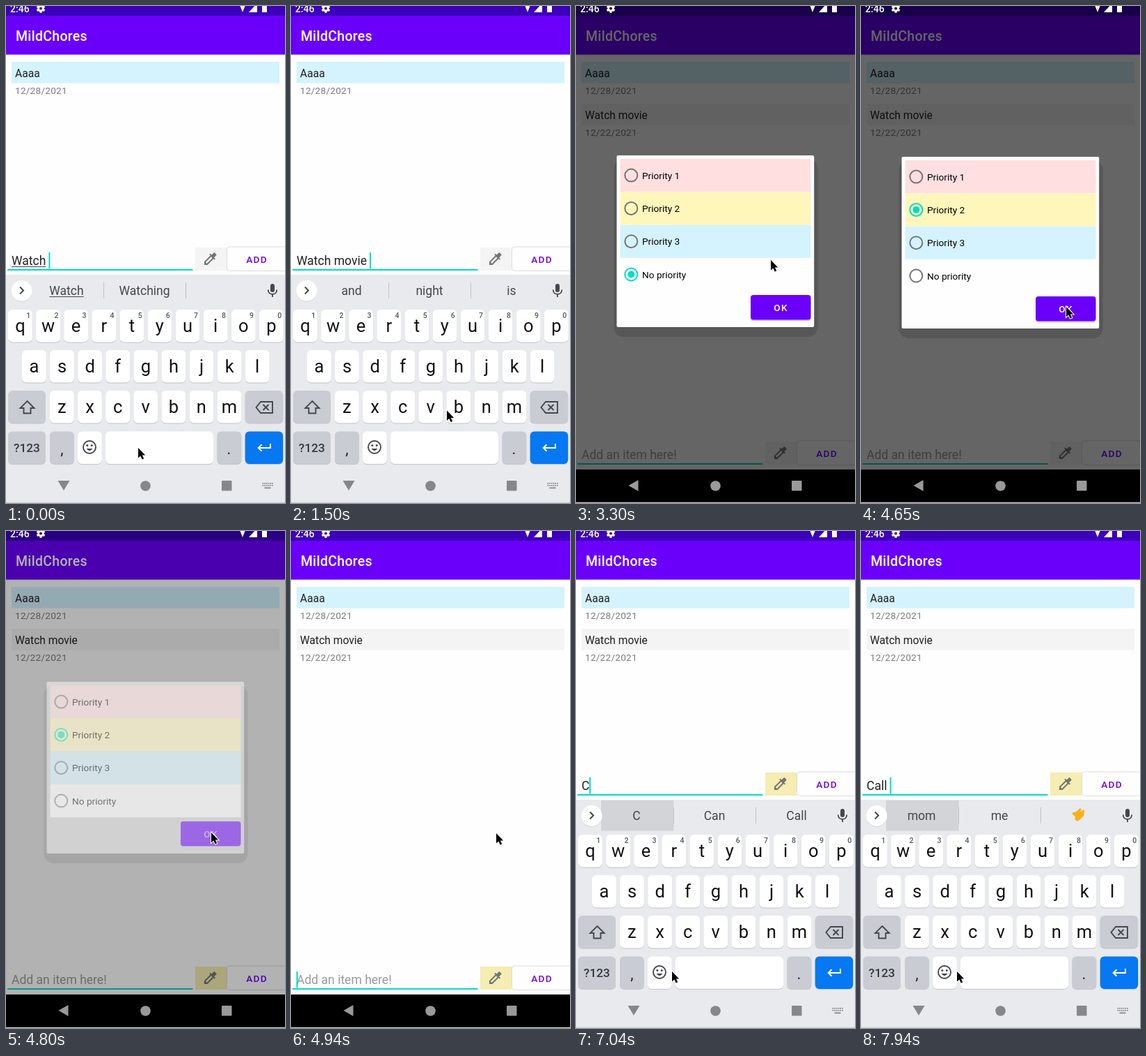
Recreate the animation shown at these times as an HTML page with a canvas. Size 401 px wide and 712 px high, loop 8000 ms.

```html
<!DOCTYPE html>
<html lang="en">
<head>
<meta charset="utf-8">
<title>To-do app</title>
<style>
html, body { margin: 0; width: 100%; height: 100%; overflow: hidden; background: #fefefe; }
canvas { display: block; width: 401px; height: 712px; }
</style>
</head>
<body>
<canvas id="stage"></canvas>
<script>
const W = 401, H = 712, LOOP = 8000;
const canvas = document.getElementById('stage');
const ctx = canvas.getContext('2d');
const dpr = window.devicePixelRatio || 1;
canvas.width = W * dpr;
canvas.height = H * dpr;

const PURPLE = '#6a00fa', TEAL = '#00dbc6', PANEL = '#e8eaed', GREY_KEY = '#c9ccd2', INK = '#44474b';
const DROPPER = new Path2D('M20.7 5.6l-2.3-2.3c-.4-.4-1-.4-1.4 0l-3.1 3.1-2-1.9-1.4 1.4 1.4 1.4L3 16.25V21h4.75l8.9-8.9 1.4 1.4 1.4-1.4-1.9-1.9 3.1-3.1c.4-.4.4-1 0-1.5zM6.9 19L5 17.1l8.06-8.06 1.9 1.9z');
const HAND = new Path2D('M-8-4L-4-4L3-10L5-8L2-4L8-8L9-6L8 1L3 6L-1 9L-5 6L-4 2L-8-1Z');
const ARROW = new Path2D('M0 0V14.5L3.3 11.4L5.7 16.5L8.2 15.4L5.9 10.4H10.2Z');

// Typing: time, text, suggestions, index where the underlined word begins
const TYPING = [
  [0, 'Watch ', ['Watch', 'Watching', ''], 0],
  [150, 'Watch m', ['my', 'me', 'movie'], 6],
  [300, 'Watch mo', ['mo', 'movie', 'more'], 6],
  [450, 'Watch mov', ['mov', 'movie', 'movies'], 6],
  [750, 'Watch movi', ['movi', 'movie', 'movies'], 6],
  [900, 'Watch movie', ['movie', 'movies', 'moving'], 6],
  [1350, 'Watch movie ', ['and', 'night', 'is'], -1],
  [2400, '', null, -1],
  [6740, 'C', ['C', 'Can', 'Call'], -1],
  [7340, 'Ca', ['Ca', 'Can', 'Call'], 0],
  [7490, 'Cal', ['Cal', 'Call', 'Can'], 0],
  [7640, 'Call', ['Call', 'Calls', 'Can'], 0],
  [7790, 'Call ', ['mom', 'me', 'hand'], -1]
];
const POINTER = [
  [0, 190, 633], [1350, 190, 633], [2100, 360, 366], [2550, 360, 366], [3000, 287, 367],
  [3300, 280, 364], [3750, 108, 291], [4050, 108, 291], [4500, 295, 431], [4650, 295, 431],
  [4940, 295, 433], [5090, 177, 559], [5540, 138, 631], [8000, 138, 631]
];
const CARET_ON = [[0, 1800], [2400, 2850], [4900, 5390], [5840, 6290], [6740, 8000]];

const rect = (x, y, w, h, color) => { ctx.fillStyle = color; ctx.fillRect(x, y, w, h); };
function box(x, y, w, h, r, color, border) {
  ctx.beginPath();
  ctx.roundRect(x, y, w, h, r);
  ctx.fillStyle = color;
  ctx.fill();
  if (border) { ctx.strokeStyle = border; ctx.lineWidth = 1; ctx.stroke(); }
}
function text(str, x, y, size, color, { align = 'left', weight = 400, spacing = 0 } = {}) {
  ctx.font = `${weight} ${size}px Roboto, sans-serif`;
  ctx.letterSpacing = spacing + 'px';
  ctx.textAlign = align;
  ctx.fillStyle = color;
  ctx.fillText(str, x, y);
  return ctx.measureText(str).width;
}
function disc(x, y, r, color, lineWidth) {
  ctx.beginPath();
  ctx.arc(x, y, r, 0, Math.PI * 2);
  ctx.fillStyle = ctx.strokeStyle = color;
  if (lineWidth) { ctx.lineWidth = lineWidth; ctx.stroke(); } else ctx.fill();
}
function draw(path, x, y, color, { line = 0, scale = 1 } = {}) {
  const shape = typeof path === 'string' ? new Path2D(path) : path;
  ctx.save();
  ctx.translate(x, y);
  ctx.scale(scale, scale);
  ctx.fillStyle = ctx.strokeStyle = color;
  ctx.lineWidth = line;
  if (line) ctx.stroke(shape); else ctx.fill(shape);
  ctx.restore();
}
function gear(x, y, r, color) {
  disc(x, y, r * .54, color, r * .44);
  for (let i = 0; i < 6; i++) {
    ctx.save();
    ctx.translate(x, y);
    ctx.rotate(i * Math.PI / 3);
    rect(-r * .25, -r, r * .5, r * .4, color);
    ctx.restore();
  }
}
function pointerAt(t) {
  const i = POINTER.findIndex(p => p[0] > t);
  const [t0, x0, y0] = POINTER[i - 1], [t1, x1, y1] = POINTER[i];
  const k = (t - t0) / (t1 - t0);
  return [x0 + (x1 - x0) * k, y0 + (y1 - y0) * k];
}

function statusIcons() {
  text('2:46', 6, 9, 14, '#fff', { weight: 500 });
  gear(50, 3.5, 6.3, '#fff');
  draw('M-7-9L0 9L7-9Z', 340, 0, '#fff');
  draw('M0 9H12V-4Z', 349, 0, '#fff');
  rect(368, 0, 7, 9, '#fff');
}
function listRow(y, title, date, color) {
  rect(8, y, 385, 30.5, color);
  text(title, 13, y + 21.5, 15.6, '#202020');
  text(date, 13, y + 46, 13.65, '#7b7b7b', { spacing: .22 });
}
function inputRow(t, top, [, value, , mark]) {
  const base = top + 27;
  const width = text(value, 8, base, 17.55, '#222');
  if (!value) text('Add an item here!', 8, base, 17.55, '#9a9a9a');
  if (mark >= 0) {
    const start = 8 + ctx.measureText(value.slice(0, mark)).width;
    rect(start, base + 2, 8 + ctx.measureText(value.trim()).width - start, 1, '#444');
  }
  rect(2, top + 33, 266.5, 2, TEAL);
  if (CARET_ON.some(([a, b]) => t >= a && t < b)) rect(7.7 + width, top + 9, 2, 23.5, TEAL);

  rect(272, top + 2, 45, 33, t >= 4800 ? '#f5edb1' : '#f4f4f4');
  draw(DROPPER, 282, top + 6.3, '#757575', { scale: .98 });
  box(317.5, top + 1, 90, 34.5, 4, '#fefefe', '#dcdcdc');
  text('ADD', 360.5, top + 23.5, 13.65, PURPLE, { align: 'center', weight: 500, spacing: 1.2 });
}

function key(x, y, w, label, color = '#fff') {
  box(x, y + 1, w, 46.5, 6, '#c1c4c8');
  box(x, y, w, 46.5, 6, color);
  if (label) text(label, x + w / 2, y + 32, 25.5, '#111', { align: 'center' });
}
function microphone(x, y) {
  box(x - 3, y - 9.5, 6, 12, 3, INK);
  draw('M-6.3-1C-6 7.5 6 7.5 6.3-1M0 5V9.5', x, y, INK, { line: 1.8 });
}
function suggestionBar(t, words) {
  if (t >= 7040) rect(36, 386, 104.5, 43.5, '#d2d4d7');
  disc(22.5, 409, 15, '#d5d7da');
  disc(22.5, 408, 15, '#fff');
  draw(words ? 'M-2.5-5L2.5 0L-2.5 5' : 'M2.5-5L-2.5 0L2.5 5', 22.5, 407.5, INK, { line: 2 });
  microphone(383, 407.5);
  if (!words) return toolIcons();
  rect(140, 396, 1, 23, '#bfc1c5');
  rect(258, 396, 1, 23, '#bfc1c5');
  words.forEach((word, i) => {
    if (word === 'hand') return draw(HAND, 312, 407, '#fbb117');
    const x = [87, 199, 317][i];
    const width = text(word, x, 414, 17.55, INK, { align: 'center' });
    if (t < 150 && i === 0) rect(x - width / 2, 416, width, 1, INK);
  });
}
function toolIcons() {
  draw('M-7-7.5H7.5V2L2 7.5H-7.5V-7.5M7.5 1H2V7.5M-3.5 1Q-1 4 2 2', 76.5, 407.5, INK, { line: 1.8 });
  disc(73.5, 405, 1.3, INK);
  disc(79.5, 405, 1.3, INK);
  text('GIF', 134.5, 412.5, 14.5, INK, { align: 'center', weight: 900 });
  draw('M-7-7H7V8.5H-7ZM-4-1H4M-4 2H4M-4 5H2', 194, 407.5, INK, { line: 1.7 });
  box(190, 398.5, 8, 5, 1, INK);
  gear(252.5, 408, 9, INK);
  rect(287.5, 397, 1, 22, '#bfc1c5');
  for (const dx of [-6, 0, 6]) disc(324 + dx, 408, 1.9, INK);
}
function keyboard(t, words) {
  rect(0, 385, W, 330, PANEL);
  suggestionBar(t, words);
  const pitch = 40.1;
  [...'qwertyuiop'].forEach((c, i) => {
    key(3 + i * pitch, 435, 34.8, c);
    text((i + 1) % 10, 32.3 + i * pitch, 447, 10.5, '#55585c', { align: 'center', weight: 500 });
  });
  [...'asdfghjkl'].forEach((c, i) => key(23 + i * pitch, 493, 34.8, c));
  [...'zxcvbnm'].forEach((c, i) => key(63 + i * pitch, 551, 34.8, c));
  key(3, 551, 54, '', GREY_KEY);
  key(343.7, 551, 54.5, '', GREY_KEY);
  draw('M0-9L10 1H5V8.5H-5V1H-10Z', 30.5, 575, INK, { line: 1.9 });
  draw('M-5-8H12V8H-5L-11.5 0ZM-1.5-4L6.5 4M6.5-4L-1.5 4', 371, 575, INK, { line: 1.9 });

  key(3, 609.5, 54, '', GREY_KEY);
  text('?123', 30, 639, 17.3, '#35383c', { align: 'center', weight: 500 });
  key(63, 609.5, 34.8, '', GREY_KEY);
  key(103, 609.5, 34.8);
  key(143, 609.5, 155);
  key(303.5, 609.5, 34.8, '', GREY_KEY);
  text(',', 80.5, 642, 22, '#222', { align: 'center' });
  text('.', 320.5, 642, 22, '#222', { align: 'center' });
  disc(120, 632, 9, INK, 1.9);
  disc(116.8, 629.5, 1.5, INK);
  disc(123.2, 629.5, 1.5, INK);
  draw('M-4.5 2Q0 8.5 4.5 2Z', 120, 632, INK);
  key(343.7, 609.5, 54.5, '', '#0578f2');
  draw('M9-5V1H-8M-3.5-3.8L-8.3 1L-3.5 5.8', 371, 632, '#fff', { line: 2 });
}
function navBar(t, up) {
  const color = up ? '#85878a' : '#999';
  if (!up) rect(0, 664, W, 48, '#000');
  draw(up ? 'M-8.5-7H8.5L0 7Z' : 'M6.5-8V8L-7.5 0Z', 83, 687, color);
  disc(200.5, 687.5, 7.3, color);
  box(310, 680, 14.5, 14.5, 1, color);
  if (up || t >= 6740) {
    for (let i = 0; i < 12; i++) rect(368.5 + i % 6 * 2.7, 683 + (i / 6 | 0) * 3, 1.7, 1.7, color);
    rect(371.5, 689.5, 9, 1.8, color);
  }
  rect(0, 710.8, W, 1.2, up ? '#cfd0d2' : '#c4c4c4');
}

function dialog(t, alpha) {
  const shift = t >= 3450 ? 2 : 0;
  const chosen = t >= 4050 ? 1 : 3;
  const colors = ['#ffdfe0', '#fff6bb', '#d4f3fe', '#fefefe'];
  ctx.save();
  ctx.globalAlpha = alpha;
  ctx.translate(0, shift);
  box(54.5, 219, 293, 255, 14, 'rgba(0,0,0,.14)');
  box(58.5, 214, 283.7, 246, 2, '#fefefe');
  ['Priority 1', 'Priority 2', 'Priority 3', 'No priority'].forEach((label, i) => {
    const y = 219 + i * 47.3, mid = y + 23.6;
    rect(63.5, y, 274, 47.3, colors[i]);
    disc(79.3, mid, 9, i === chosen ? TEAL : '#757575', 2);
    if (i === chosen) disc(79.3, mid, 5, TEAL);
    text(label, 95, mid + 5, 13.65, '#000');
  });
  box(251, 415.5, 86.5, 36, 4, '#cfcfcf');
  box(251, 414, 86.5, 35.5, 4, PURPLE);
  text('OK', 294.5, 437, 13.65, '#fff', { align: 'center', weight: 500, spacing: 1.2 });
  ctx.restore();
}

function render(t) {
  const entry = TYPING.findLast(e => e[0] <= t);
  const raised = t < 3150 || t >= 6890;
  const slide = t === 3150 || t === 6890 ? .5 : raised ? 0 : 1;
  const shade = t < 3150 || t >= 4940 ? 0 : t === 3150 || t === 4800 ? .5 : 1;

  ctx.setTransform(dpr, 0, 0, dpr, 0, 0);
  rect(0, 0, W, H, '#fefefe');
  rect(0, 69, W, 1, '#cfcfcf');
  rect(0, 70, W, 1, '#ececec');
  rect(0, 14, W, 55.5, PURPLE);
  rect(0, 0, W, 14, '#3c00ba');
  text('MildChores', 14, 50, 19.5, '#fff', { weight: 500, spacing: .3 });
  listRow(80, 'Aaaa', '12/28/2021', '#d4f3fe');
  if (t >= 2400) listRow(140, 'Watch movie', '12/22/2021', '#f4f4f4');
  inputRow(t, raised ? 344 : 622, entry);

  if (slide < 1) {
    ctx.save();
    ctx.translate(0, slide * 327);
    keyboard(t, entry[2]);
    ctx.restore();
  }
  if (shade) rect(0, 0, W, H, `rgba(0,0,0,${.6 * shade})`);
  navBar(t, slide === 0);
  statusIcons();
  if (shade) dialog(t, shade);

  const [x, y] = pointerAt(t);
  draw(ARROW, x, y, '#fff', { line: 2 });
  draw(ARROW, x, y, '#000');
}

function heldTime(t) {
  const start = t < 4940 ? 0 : 4940;
  return start + Math.floor((t - start) / 150) * 150;
}
function tick() {
  render(heldTime(performance.now() % LOOP));
  requestAnimationFrame(tick);
}
tick();
</script>
</body>
</html>
```
